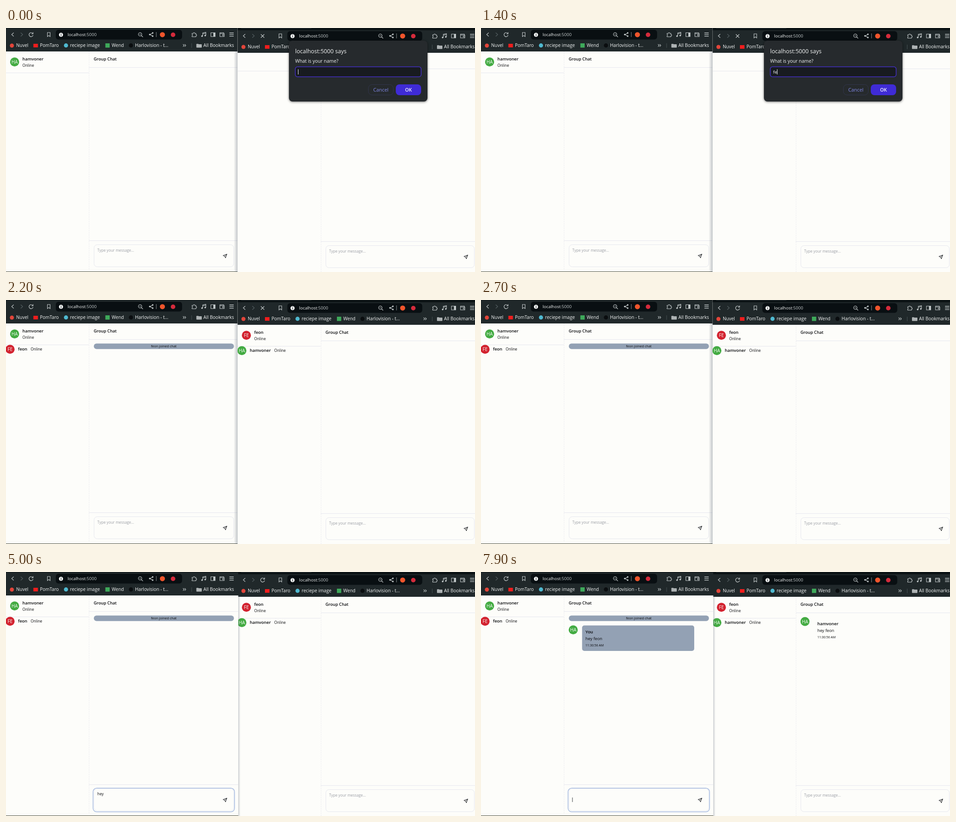
An HTML page with a canvas that plays this animation: 1036x541 px, repeating every 8 s.

```html
<!DOCTYPE html>
<html lang="en">
<head>
<meta charset="utf-8">
<title>Group Chat</title>
<style>
  html, body { margin: 0; width: 100%; height: 100%; overflow: hidden; background: #fdfdfa; }
  canvas { display: block; width: 1036px; height: 541px; }
</style>
</head>
<body>
<canvas id="stage" width="1036" height="541"></canvas>
<script>
const ctx = document.getElementById('stage').getContext('2d');
const LOOP = 8000;
const PAGE = '#fdfdfa', BAR = '#20282a', FIELD = '#090f12', SLATE = '#93a1b4';
const LIGHT = '#f4f6f6', ICON = '#c4cacb', INK = '#08090c', RULE = '#e6e7ee';

const HOST = { name: 'hamvoner', mark: 'HA', color: '#43ab42' };
const GUEST = { name: 'feon', mark: 'FE', color: '#d3222f' };
const JOIN = 2200, LOADED = 2700, RAISE = 3700, SENT = 7800;

// [start time, content, caret shown]
const promptSteps = [
  [0, '', true], [400, '', false], [900, '', true], [1200, 'f', true],
  [1400, 'fe', true], [1600, 'feo', true], [1800, 'feon', true]
];
const draftSteps = [
  [0, '', false], [RAISE, '', true], [4100, 'h', true], [4200, 'he', true],
  [4400, 'hey', true], [5000, 'hey', false], [5600, 'hey f', true],
  [5700, 'hey feno', true], [6000, 'hey fe', true], [6300, 'hey f', true],
  [6400, 'hey ', true], [6600, 'hey f', true], [6900, 'hey fe', true],
  [7300, 'hey feo', true], [7500, 'hey feon', true], [SENT, '\n', true]
];
const stepAt = (steps, t) => steps.filter(s => s[0] <= t).pop();

function rect(x, y, w, h, color) {
  ctx.fillStyle = color;
  ctx.fillRect(x, y, w, h);
}

function round(x, y, w, h, r, fill, stroke, width = 1) {
  ctx.beginPath();
  ctx.roundRect(x, y, w, h, r);
  if (fill) { ctx.fillStyle = fill; ctx.fill(); }
  if (stroke) { ctx.strokeStyle = stroke; ctx.lineWidth = width; ctx.stroke(); }
}

function disc(x, y, r, color) {
  ctx.beginPath();
  ctx.arc(x, y, r, 0, 7);
  ctx.fillStyle = color;
  ctx.fill();
}

function path(d, color = ICON, width = 1.1) {
  ctx.strokeStyle = color;
  ctx.lineWidth = width;
  ctx.stroke(new Path2D(d));
}

function text(str, x, y, size, color = INK, weight = 500, align = 'left') {
  ctx.font = `${weight} ${size}px "Open Sans", "Noto Sans", sans-serif`;
  ctx.textAlign = align;
  ctx.fillStyle = color;
  ctx.fillText(str, x, y);
  return ctx.measureText(str).width;
}

function rule(x1, y1, x2, y2, dashed) {
  ctx.setLineDash(dashed ? [2, 2] : []);
  path(`M${x1} ${y1}L${x2} ${y2}`, RULE, 1);
  ctx.setLineDash([]);
}

function fade(x, w, from, to) {
  const shade = ctx.createLinearGradient(x, 0, x + w, 0);
  shade.addColorStop(0, `rgba(90,100,115,${from})`);
  shade.addColorStop(1, `rgba(90,100,115,${to})`);
  rect(x, 52, w, 489, shade);
}

function avatar(user, x, y) {
  disc(x, y, 10, user.color);
  text(user.mark, x, y + 3.8, 10.3, '#f4faf4', 400, 'center');
}

function navIcons(loading) {
  path('M17 10.5l-4.5 4 4.5 4');
  path('M32.5 10.5l4.5 4-4.5 4', '#566063');
  if (loading) path('M51.5 11l7.5 7.5M59 11l-7.5 7.5', ICON, 1.2);
  else {
    path('M58.8 11.8a4.5 4.5 0 1 0 1 4', ICON, 1.2);
    path('M59.8 9.5v3.3h-3.3', ICON, 1.2);
  }
  path('M91.5 10h6v9l-3-2.4-3 2.4z');
}

function addressIcons() {
  path('M300 14a3.8 3.8 0 1 1-7.6 0a3.8 3.8 0 1 1 7.6 0M299 17l3.5 3M294.6 14h3.2');
  path('M323.5 11.5l-5.5 3 5.5 3.5');
  for (const [x, y] of [[324, 11], [317.5, 14.5], [324, 18]]) disc(x, y, 1.7, ICON);
  rect(331.5, 9, 1, 11, '#879092');
  disc(345.5, 14.8, 5.6, '#f0552c');
  disc(369, 15, 5, '#d52b3c');
}

function toolIcons() {
  path('M411 12h2.7a1.7 1.7 0 0 1 3.4 0h2.4v2.4a1.7 1.7 0 0 1 0 3.4v1.7H411v-2.2a1.7 1.7 0 0 0 0-3.2z');
  path('M434.5 18v-7l7-1.5v7M434.5 13l7-1.5');
  disc(433, 18, 1.8, ICON);
  disc(440, 16.8, 1.8, ICON);
  path('M452.5 10.5h9.5v8.5h-9.5z');
  rect(458, 10.5, 4, 8.5, ICON);
  path('M481 12v-1.5h-8.5v8.5h9.5v-6.5h-9M478.5 14.5h3.5v2.5h-3.5z');
  path('M493.5 11h9.5M493.5 14.7h9.5M493.5 18.4h9.5', ICON, 1.3);
}

function bookmarks() {
  disc(13, 39, 4.5, '#e2453a');
  text('Nuvel', 22.5, 42, 10, LIGHT, 400);
  rect(60.5, 35, 10, 8, '#f01d1d');
  text('PomTaro', 75, 42, 10, LIGHT, 400);
  disc(132.5, 38.7, 4.6, '#4fb9d0');
  text('reciepe image', 141.5, 42, 10.1, LIGHT, 400);
  rect(219.5, 34, 9.5, 9.5, '#3ea95a');
  text('Wend', 233.5, 42, 10, LIGHT, 400);
  disc(276, 38.7, 4.6, '#0a0d0f');
  text('Harlovision - t…', 285, 42, 10.2, LIGHT, 400);
}

function bookmarkEnd() {
  path('M391 36l2.6 2.7-2.6 2.7M394.6 36l2.6 2.7-2.6 2.7');
  rect(409.5, 34, 1, 10, '#465053');
  round(420.5, 35, 5, 3, 1, '#8f9597');
  round(420.5, 36, 12, 7.5, 1, '#aeb3b4');
  text('All Bookmarks', 436, 42, 10.15, LIGHT, 400);
}

function browser(extra, loading) {
  const shifted = (dx, draw) => {
    ctx.save();
    ctx.translate(dx, 0);
    draw();
    ctx.restore();
  };
  rect(0, 0, 530, 52, BAR);
  rect(0, 0, 530, 1, '#0d1517');
  round(110, 4, 279 + extra * .95, 21.5, 6, FIELD);
  navIcons(loading);
  disc(121.5, 15, 4.6, '#f2f4f4');
  rect(121, 14.2, 1.2, 3.4, FIELD);
  rect(121, 12, 1.2, 1.2, FIELD);
  const hostWidth = text('localhost', 136, 18, 9.5, LIGHT, 400);
  text(':5000', 136 + hostWidth, 18, 9.5, '#c6cccd', 400);
  bookmarks();
  shifted(extra * .96, addressIcons);
  shifted(extra, () => { toolIcons(); bookmarkEnd(); });
}

function sidebar(me, other) {
  if (me) {
    avatar(me, 19, 75.3);
    text(me.name, 36.3, 72.2, 9.4, INK, 600);
    text('Online', 36.3, 86, 8.3);
  }
  const y = me ? 99.5 : 92.5;
  rule(0, y, 183, y);
  if (other) {
    avatar(other, 9, 109.2);
    const width = text(other.name, 26.5, 112.2, 9.4, INK, 600);
    text('Online', 26.5 + width + 7.5, 112, 8.3);
  }
}

function composer(extra, drop, focused, draft, caret) {
  rule(183, 471.5 + drop, 530, 471.5 + drop);
  if (focused) round(192.3, 479.3, 312.5, 52.5, 8, PAGE, '#a6bae0', 1.5);
  round(194.5, 480.5 + drop, 308.5 + extra, 49, 7, null, focused ? '#e6eaf3' : RULE);
  if (!draft) text('Type your message...', 201.8, 495.5 + drop, 8.3, '#9a9da4', 400);
  const lines = draft.split('\n'), row = lines.length - 1;
  const width = text(lines[0], 201.8, 495.4, 8.3);
  if (caret) rect(201.5 + (row ? 0 : width), 488 + row * 12, 1, 10, '#33363b');
  ctx.save();
  ctx.translate(extra * 1.03, drop);
  path('M488 501.3l-8.5 3.2 3.7 1.7 1.6 3.8zM488 501.3l-4.8 4.9', '#15181c', 1);
  ctx.restore();
}

function message(x, y, who) {
  text(who, x, y, 9.4, INK, 600);
  text('hey feon', x, y + 14.6, 9.2);
  text('11:30:56 AM', x, y + 29, 7);
}

function hostWindow(t) {
  const front = t >= RAISE, width = front ? 513 : 511.5;
  const [, draft, caret] = stepAt(draftSteps, t);
  ctx.save();
  ctx.beginPath();
  ctx.rect(0, 0, width, 541);
  ctx.clip();
  rect(0, 0, width, 541, PAGE);
  browser(0, false);
  sidebar(HOST, t >= JOIN ? GUEST : null);
  rule(183.5, 52, 183.5, 540, true);
  rule(183, 87.5, width, 87.5);
  text('Group Chat', 193.8, 72.2, 9.2, INK, 600);
  if (t >= JOIN) {
    round(194, 96.5, 309.5, 12.3, 6, SLATE);
    text('feon joined chat', 348.5, 105.2, 7.5, INK, 500, 'center');
  }
  if (t >= SENT) {
    avatar(HOST, 203.7, 128.3);
    round(223.3, 118.5, 247.7, 56.5, 5, SLATE);
    message(230.8, 136.3, 'You');
  }
  composer(0, 0, front, draft, caret);
  rect(0, 540, width, 1, '#3f4230');
  if (!front) fade(503, 9, 0, .38);
  ctx.restore();
  if (front) fade(513, 5, .3, 0);
}

function guestWindow(t) {
  const joined = t >= JOIN;
  ctx.save();
  ctx.translate(511.5, 3);
  ctx.beginPath();
  ctx.rect(0, -3, 525, 541);
  ctx.clip();
  rect(0, -3, 525, 541, PAGE);
  browser(20, t < LOADED);
  rect(0, -3, 525, 5, '#0b1214');
  rect(8, -3, 155, 1, '#2c3437');
  ctx.translate(.5, 0);
  sidebar(joined ? GUEST : null, joined ? HOST : null);
  rule(184, 52, 184, 540, true);
  rule(184, 87.5, 530, 87.5);
  if (joined) text('Group Chat', 193.8, 72.2, 9.2, INK, 600);
  composer(19.5, -1, false, '', false);
  if (t >= SENT) {
    avatar(HOST, 203.7, 106.8);
    message(231, 115, HOST.name);
  }
  ctx.restore();
}

function promptBox(t) {
  const [, value, caret] = stepAt(promptSteps, t);
  ctx.save();
  ctx.shadowColor = 'rgba(0,0,0,.55)';
  ctx.shadowBlur = 5;
  ctx.shadowOffsetY = 1;
  round(625, 28, 306, 135, 8, '#262a2d');
  ctx.restore();
  text('localhost:5000 says', 638.8, 56.3, 12.6, LIGHT, 500);
  text('What is your name?', 638.8, 77, 10.4, LIGHT, 400);
  round(639, 86, 278, 22.3, 5, '#181b20', '#432fc4', 1.5);
  const width = text(value, 645.3, 101, 9.8, LIGHT, 400);
  if (caret) rect(645 + width, 91.5, 1, 11.5, LIGHT);
  round(800.5, 125.5, 55, 23, 8, null, '#32354c');
  text('Cancel', 828, 141, 10.9, '#8088e6', 400, 'center');
  round(861, 125, 56, 24, 8, '#3f2bd6');
  text('OK', 889, 141, 10.6, '#f5f5ff', 600, 'center');
}

function draw(t) {
  const order = t >= RAISE ? [guestWindow, hostWindow] : [hostWindow, guestWindow];
  order.forEach(paint => paint(t));
  if (t < JOIN) promptBox(t);
}

const start = performance.now();
function tick() {
  draw((performance.now() - start) % LOOP);
  requestAnimationFrame(tick);
}
tick();
</script>
</body>
</html>
```
